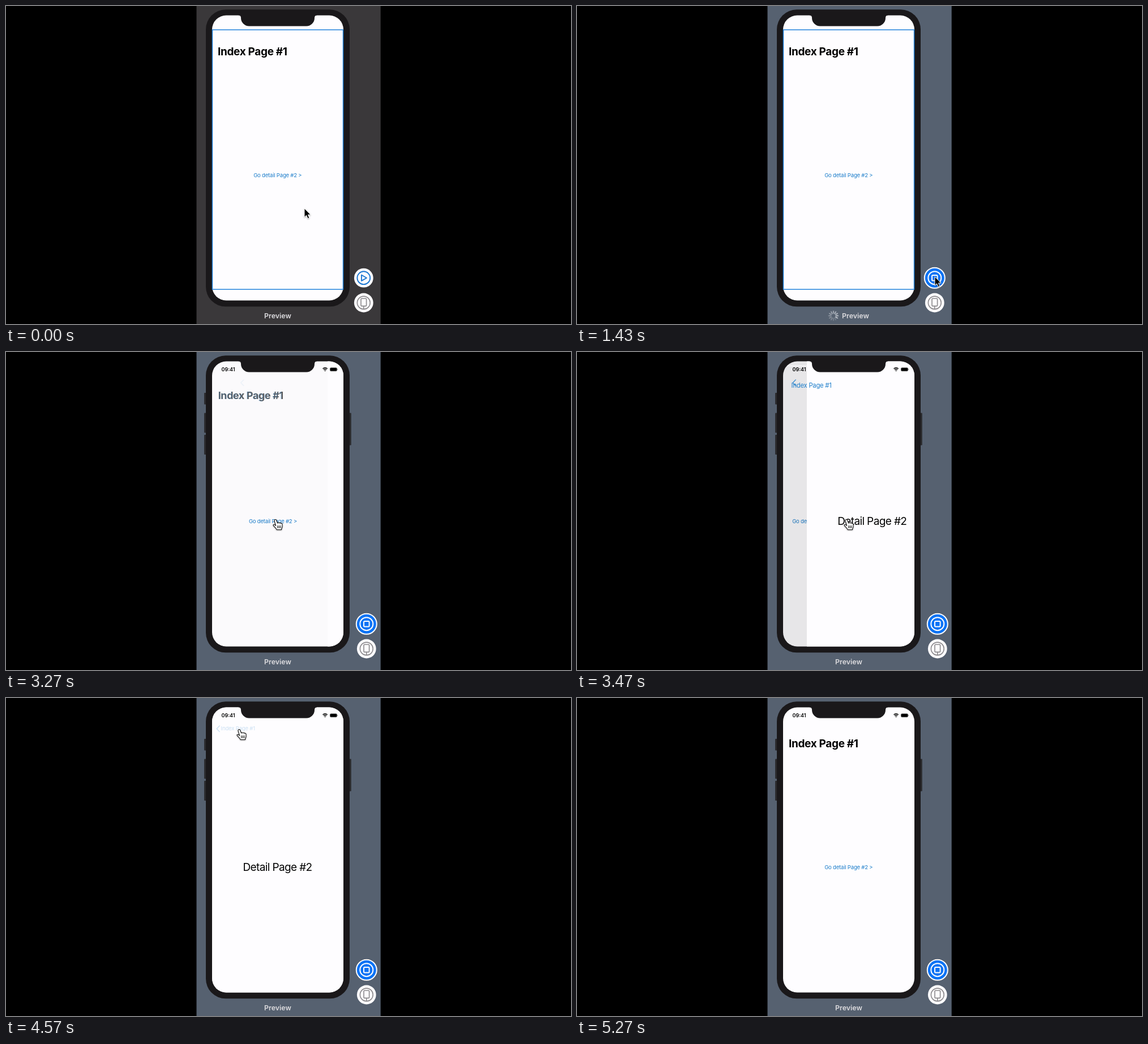
Write an HTML page that moves like this. It is 998 px wide and 561 px high and loops after 5.33 s.

```html
<!DOCTYPE html>
<html lang="en">
<head>
<meta charset="utf-8">
<title>Preview</title>
<style>
  html, body { margin: 0; width: 100%; height: 100%; overflow: hidden; background: #000; }
  svg { display: block; width: 998px; height: 561px; font-family: Inter, "Liberation Sans", sans-serif; }
  .a { animation: 5330ms linear infinite both; }
  .mid { text-anchor: middle; }

  /* Preview panel */
  .panel { animation-name: panel; }
  @keyframes panel { 0%, 18.2% { fill: #3a383a } 19.9%, 100% { fill: #566170 } }
  .label { font-size: 12.4px; font-weight: 600; animation-name: label; animation-timing-function: step-end; }
  @keyframes label { 0% { transform: none } 18.76% { transform: translateX(12px) } 29.27%, 100% { transform: none } }
  .busy { animation-name: busy; animation-timing-function: step-end; }
  @keyframes busy { 0% { opacity: 0 } 18.76% { opacity: 1 } 29.27%, 100% { opacity: 0 } }
  .spin { animation: spin 1s steps(12) infinite; transform-origin: 453px 546.5px; }
  @keyframes spin { to { transform: rotate(360deg) } }
  .tools { animation-name: tools; animation-timing-function: step-end; }
  @keyframes tools { 0% { transform: none } 29.27%, 100% { transform: translateX(5px) } }
  .still { animation-name: still; animation-timing-function: step-end; }
  @keyframes still { 0% { opacity: 1 } 18.76%, 100% { opacity: 0 } }
  .on { animation-name: on; animation-timing-function: step-end; }
  @keyframes on { 0% { opacity: 0 } 18.76%, 100% { opacity: 1 } }
  .frame { animation-name: frame; animation-timing-function: step-end; }
  @keyframes frame { 0% { opacity: 1 } 29.27%, 100% { opacity: 0 } }
  .live { animation-name: live; animation-timing-function: step-end; }
  @keyframes live { 0% { opacity: 0 } 29.27%, 100% { opacity: 1 } }

  /* Page push and pop */
  .index, .detail, .dim, .title, .big, .small, .chev { --push: cubic-bezier(.36, .66, .04, 1); }
  .index { animation-name: index; }
  @keyframes index {
    0%, 60.3% { transform: none; animation-timing-function: var(--push) }
    69.6%, 85.9% { transform: translateX(-69.6px); animation-timing-function: var(--push) }
    95.2%, 100% { transform: none }
  }
  .detail { animation-name: detail; }
  @keyframes detail {
    0%, 60.3% { transform: translateX(232px); animation-timing-function: var(--push) }
    69.6%, 85.9% { transform: none; animation-timing-function: var(--push) }
    95.2%, 100% { transform: translateX(232px) }
  }
  .dim { animation-name: dim; }
  @keyframes dim {
    0%, 60.3% { opacity: 0; animation-timing-function: var(--push) }
    69.6%, 85.9% { opacity: .11; animation-timing-function: var(--push) }
    95.2%, 100% { opacity: 0 }
  }
  /* Large title shrinks into the back label */
  .title { animation-name: title; }
  @keyframes title {
    0%, 60.3% { transform: translate(374px, 86.6px); animation-timing-function: var(--push) }
    69.6%, 85.9% { transform: translate(379.6px, 57.4px) scale(.5); animation-timing-function: var(--push) }
    95.2%, 100% { transform: translate(374px, 86.6px) }
  }
  .big { font-size: 19px; font-weight: 700; letter-spacing: -.34px; animation-name: big; }
  @keyframes big {
    0%, 60.3% { opacity: 1 } 63.2%, 86.2% { opacity: 0 } 90%, 100% { opacity: 1 }
  }
  .small { font-size: 19px; letter-spacing: -.34px; fill: #1a7cca; animation-name: small; }
  @keyframes small {
    0%, 60.6% { opacity: 0 } 63.5%, 85.7% { opacity: 1 } 85.74%, 86.4% { opacity: .22 } 90%, 100% { opacity: 0 }
  }
  .chev { animation-name: chev; }
  @keyframes chev {
    0%, 60.6% { opacity: 0; transform: translateX(46px); animation-timing-function: var(--push) }
    69.6%, 85.7% { opacity: 1; transform: none }
    85.74%, 86.4% { opacity: .22; transform: none }
    89%, 100% { opacity: 0; transform: none }
  }

  /* Pointer */
  .arrow { animation-name: arrow; }
  @keyframes arrow {
    0%, .4% { transform: translate(527px, 357px); animation-timing-function: ease-in-out }
    9.94%, 36.5% { transform: translate(632px, 477.5px); opacity: 1; animation-timing-function: ease-in }
    41.5% { transform: translate(608px, 455px); opacity: 1 }
    41.51%, 100% { transform: translate(608px, 455px); opacity: 0 }
  }
  .hand { animation-name: hand; }
  @keyframes hand {
    0%, 41.5% { transform: translate(604px, 451px); opacity: 0 }
    41.51% { transform: translate(604px, 451px); opacity: 1; animation-timing-function: ease-out }
    48.6%, 49.2% { transform: translate(490.5px, 335px); animation-timing-function: ease-in-out }
    55.72%, 71.5% { transform: translate(475px, 296px); animation-timing-function: ease-in-out }
    81.24%, 96.25% { transform: translate(411px, 56px); opacity: 1 }
    98.5%, 100% { transform: translate(411px, 56px); opacity: 0 }
  }
</style>
</head>
<body>
<svg viewBox="0 0 998 561">
  <defs>
    <clipPath id="screen"><rect x="364" y="16.5" width="232" height="503" rx="25"/></clipPath>
    <filter id="soft" x="-50%" y="-50%" width="200%" height="200%">
      <feDropShadow dx="0" dy="1" stdDeviation="1" flood-opacity=".35"/>
    </filter>
  </defs>

  <rect class="a panel" x="336.5" width="325.2" height="561"/>

  <g class="a live" fill="#2b2b2e">
    <rect x="350" y="72" width="6" height="20.5" rx="1"/>
    <rect x="350" y="107.5" width="6" height="35" rx="1"/>
    <rect x="350" y="146" width="6" height="35" rx="1"/>
    <rect x="604" y="107.5" width="5.8" height="57" rx="1"/>
  </g>
  <rect x="353" y="6.3" width="254" height="524" rx="35" fill="#1a181a"/>

  <g clip-path="url(#screen)">
    <rect x="364" y="16" width="232" height="504" fill="#fefdff"/>
    <g class="a index">
      <text class="mid" x="479.8" y="301.7" font-size="9.53" letter-spacing="-.2" fill="#1a7cca">Go detail Page #2 &gt;</text>
    </g>
    <rect class="a dim" x="364" y="16" width="232" height="504"/>
    <g class="a detail">
      <rect x="364" y="16" width="232" height="504" fill="#fefdff"/>
      <text class="mid" x="479.5" y="305.3" font-size="19" letter-spacing="-.62">Detail Page #2</text>
    </g>
    <g class="a title">
      <text class="a big">Index Page #1</text>
      <text class="a small">Index Page #1</text>
    </g>
    <path class="a chev" d="M377.2 49l-5 5.2 5 5.2" fill="none" stroke="#1a7cca" stroke-width="1.4" stroke-linecap="round" stroke-linejoin="round"/>
  </g>

  <path d="M411 16h138v.6q-4 .2-4 4.4a14.4 14.4 0 0 1-14.4 14.4h-101.2a14.4 14.4 0 0 1-14.4-14.4q0-4.200-4-4.400z" fill="#1a181a"/>
  <g class="a live">
    <text x="380.5" y="34" font-size="9" font-weight="600">09:41</text>
    <g fill="none" stroke="#000" stroke-width="1.4">
      <path d="M559.500 29.500q4.100-3.700 8.200 0M561.200 31.400q2.400-2.100 4.800 0"/>
    </g>
    <path d="M563.600 34.200l-1.400-1.500q1.400-1.100 2.800 0z"/>
    <rect x="572.3" y="27.700" width="12.300" height="6.100" rx="1.700" stroke="#777" stroke-width=".6"/>
    <rect x="585.300" y="29.600" width=".9" height="2.200" rx=".4" fill="#777"/>
  </g>
  <rect class="a frame" x="364.5" y="42" width="231" height="457.800" fill="none" stroke="#2383dc" stroke-width="1.500"/>

  <text class="a label mid" x="480" y="550.800" fill="#dddcdf">Preview</text>
  <g class="a busy"><g class="spin" id="spinner" stroke="#e2e5ea" stroke-width="1.500" stroke-linecap="round"></g></g>

  <g class="a tools">
    <g class="a still">
      <circle cx="631.800" cy="479.700" r="16.900" fill="#fdfcfe"/>
      <g fill="none" stroke="#1c78d2" stroke-width="1.900" stroke-linejoin="round">
        <circle cx="631.800" cy="479.700" r="11.400"/>
        <path d="M628 474.500v10.400l9-5.200z"/>
      </g>
    </g>
    <g class="a on">
      <circle cx="631.800" cy="479.700" r="18" fill="#0a73f5" stroke="#fdfcfe" stroke-width="2"/>
      <g fill="none" stroke="#fdfcfe" stroke-width="2">
        <circle cx="631.800" cy="479.700" r="11.500"/>
        <rect x="627" y="474.900" width="9.600" height="9.600" rx="1.500"/>
      </g>
    </g>
    <circle cx="631.800" cy="523.500" r="16.900" fill="#fdfcfe"/>
    <g fill="none" stroke="#8b898c" stroke-width="1.600">
      <circle cx="631.800" cy="523.500" r="11.400"/>
      <rect x="627" y="516" width="9.600" height="13.400" rx="1.500" fill="#fdfcfe"/>
      <path d="M631.800 529.400v5.300"/>
    </g>
  </g>

  <g class="a arrow">
    <path filter="url(#soft)" d="M0 0v15.600l3.600-3.300 2.500 5.700 2.700-1.200-2.400-5.500h4.700z" fill="#000" stroke="#fff" stroke-width="1"/>
  </g>
  <g class="a hand">
    <g filter="url(#soft)" stroke="#111" stroke-width="1.100" stroke-linejoin="round" stroke-linecap="round">
      <path d="M-.6 .2C.600-1.200 2.200-.4 2.600 .8L4.600 6C5.200 4.600 7 4.600 7.500 5.900 8.500 4.700 10.100 5.100 10.500 6.500 11.700 5.700 12.900 6.500 13 8V11.500C13 13.500 11.700 14.500 11.500 17.500H3.200C2.700 15.300-.6 13-2.700 10.200-3.500 8.600-1.800 7.600-.4 8.800L1.600 10.300-.8 2.300Q-1.200 1-.6 .2z" fill="#fff"/>
      <path d="M4.800 10.500v4M7.300 10.500v4M9.800 10.500v4" fill="none"/>
    </g>
  </g>
</svg>
<script>
  const spokes = 12;
  document.getElementById('spinner').innerHTML = Array.from({ length: spokes }, (_, i) =>
    `<path d="M453 542.200v-4" opacity="${0.25 + 0.75 * i / (spokes - 1)}" transform="rotate(${i * 360 / spokes} 453 546.5)"/>`
  ).join('');
</script>
</body>
</html>
```
